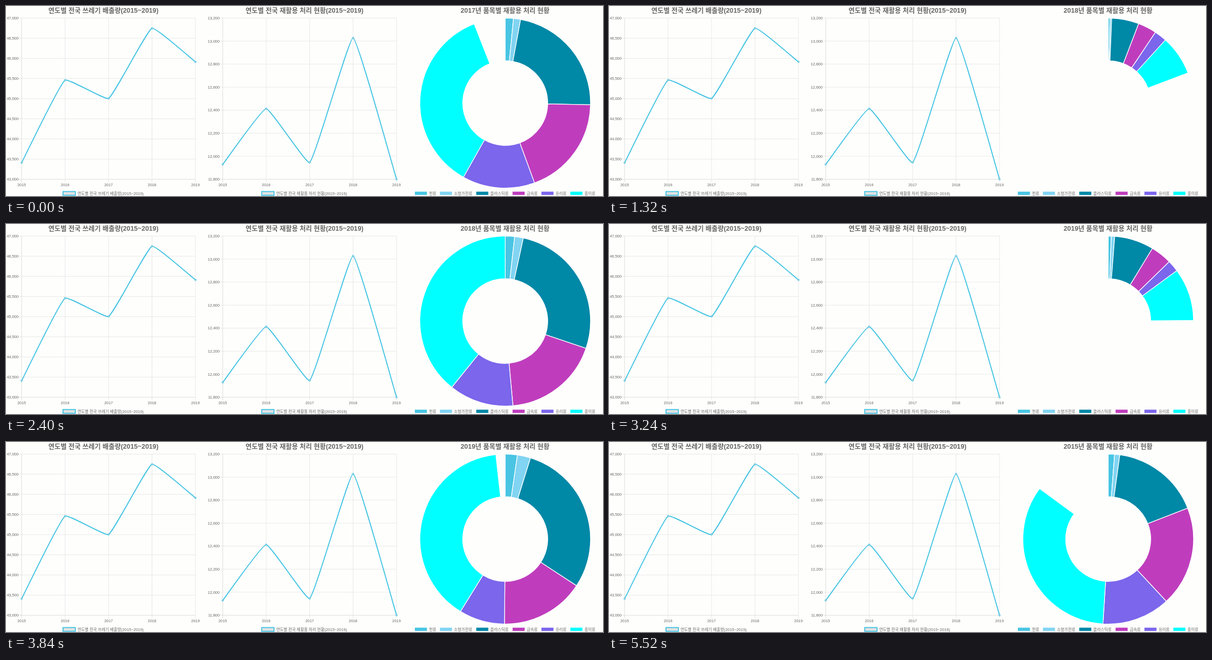
An HTML page that plays this animation: 1152x368 px, repeating every 5640 ms.

```html
<!DOCTYPE html>
<html lang="ko">
<head>
<meta charset="utf-8">
<title>재활용 현황</title>
<style>
  html, body { margin: 0; width: 100%; height: 100%; overflow: hidden; background: #fefefd; }
  svg { display: block; width: 100vw; height: 100vh; }
  text { font-family: 'Liberation Sans', 'Noto Sans CJK KR', 'Noto Sans CJK', sans-serif; font-size: 7.66px; fill: #666; }
  .title { font-size: 12.75px; font-weight: bold; fill: #666; text-anchor: middle; }
  .tick { font-size: 7.4px; }
  .grid { stroke: #e4e4e4; stroke-width: .8; }
  .axis { stroke: #d3d3d3; stroke-width: .8; }
  .line { fill: none; stroke: #41c3e2; stroke-width: 1.9; }
  .dot { fill: #a9d3df; stroke: #41c3e2; stroke-width: .8; }
  .key { fill: #e2e2e2; stroke: #41c3e2; stroke-width: 1.9; }
  .slice { stroke: #fff; stroke-width: 1.3; stroke-linejoin: bevel; }
</style>
</head>
<body>
<svg viewBox="0 0 1152 368"></svg>
<script>
const svg = document.querySelector('svg');

function add(tag, attrs, text) {
  const node = document.createElementNS('http://www.w3.org/2000/svg', tag);
  for (const name in attrs) node.setAttribute(name, attrs[name]);
  if (text) node.textContent = text;
  svg.append(node);
  return node;
}

const label = (text, x, y, cls, anchor = 'start') =>
  add('text', { x, y, class: cls, 'text-anchor': anchor }, text);
const rule = (x1, y1, x2, y2, cls) => add('line', { x1, y1, x2, y2, class: cls });

// Spline through the points; each handle follows the chord between its neighbours.
function splinePath(points, tension = 0.1) {
  const dist = (a, b) => Math.hypot(b[0] - a[0], b[1] - a[1]);
  const handles = points.map((p, i) => {
    const prev = points[i - 1] || p, next = points[i + 1] || p;
    const before = dist(prev, p), after = dist(p, next);
    const shift = amount => p.map((c, k) => c + amount * tension / (before + after) * (next[k] - prev[k]));
    return { into: shift(-before), out: shift(after) };
  });
  return points.map((p, i) =>
    i ? `C${handles[i - 1].out} ${handles[i].into} ${p}` : `M${p}`).join('');
}

function lineChart({ name, left, min, max, step, values, keyX }) {
  const top = 23.3, bottom = 335.6, width = 335.4;
  const xAt = i => left + i * width / 4;
  const yAt = v => bottom - (v - min) / (max - min) * (bottom - top);

  label(name, left + width / 2 - 9.9, 13.3, 'title');
  for (let v = min; v <= max; v += step) {
    const y = yAt(v);
    rule(left - 6, y, left + width, y, v === min ? 'axis' : 'grid');
    label(v.toLocaleString('en-US'), left - 6.2, y + 2.6, 'tick', 'end');
  }
  values.forEach((_, i) => {
    rule(xAt(i), top, xAt(i), bottom + 6, i ? 'grid' : 'axis');
    label(2015 + i, xAt(i), 349.2, 'tick', 'middle');
  });

  const points = values.map((v, i) => [xAt(i), yAt(v)]);
  add('path', { d: splinePath(points), class: 'line' });
  for (const [cx, cy] of points) add('circle', { cx, cy, r: 1.7, class: 'dot' });

  add('rect', { x: keyX, y: 359.4, width: 23.8, height: 7.2, class: 'key' });
  label(name, keyX + 28, 365.6, '');
}

lineChart({
  name: '연도별 전국 쓰레기 배출량(2015~2019)', left: 30.2, keyX: 110,
  min: 43000, max: 47000, step: 500, values: [43411, 45460, 45005, 46745, 45912]
});
lineChart({
  name: '연도별 전국 재활용 처리 현황(2015~2019)', left: 418.2, keyX: 493.4,
  min: 11800, max: 13200, step: 200, values: [11929, 12413, 11946, 13027, 11800]
});

const kinds = [
  ['천류', '#49c5e3', 789],
  ['소형가전류', '#81d4f2', 837.3],
  ['플라스틱류', '#0088a7', 907.4],
  ['금속류', '#bf3dbd', 977.5],
  ['유리류', '#7b66ec', 1033.2],
  ['종이류', '#00ffff', 1089]
];
const slices = kinds.map(([, fill]) => add('path', { fill, class: 'slice' }));
for (const [name, fill, x] of kinds) {
  add('rect', { x, y: 359.6, width: 23.3, height: 6.4, fill });
  label(name, x + 27.2, 365.6, '');
}
const yearTitle = label('', 963, 13.3, 'title', 'middle');

// Start time of each year's sweep, and where its slices end in degrees.
const years = [
  { year: 2017, start: -536, ends: [5.95, 11.05, 96.9, 170, 222.5, 360] },
  { year: 2018, start: 1265, ends: [6.4, 12.3, 108.7, 174.8, 218.8, 360] },
  { year: 2019, start: 3167, ends: [8.4, 17.55, 125.5, 183.7, 215.4, 360] },
  { year: 2015, start: 5119, ends: [5.05, 9.2, 80.7, 161, 215.6, 360] }
];
const LOOP = 5640, TICK = 120, SWEEP = 1058;
const OUTER = 164.6, INNER = 82;

function polar(radius, degrees) {
  const a = degrees * Math.PI / 180;
  return `${963.3 + radius * Math.sin(a)},${188 - radius * Math.cos(a)}`;
}

function ringSlice(from, to) {
  const large = to - from > 180 ? 1 : 0;
  return `M${polar(OUTER, from)}A${OUTER},${OUTER} 0 ${large} 1 ${polar(OUTER, to)}` +
    `L${polar(INNER, to)}A${INNER},${INNER} 0 ${large} 0 ${polar(INNER, from)}Z`;
}

function draw(time) {
  const t = Math.floor(time % LOOP / TICK) * TICK;
  const { year, start, ends } = years.filter(y => y.start <= t).pop();
  const progress = Math.min(1, (t - start) / SWEEP);
  const eased = 1 - (1 - progress) ** 4;
  yearTitle.textContent = `${year}년 품목별 재활용 처리 현황`;
  slices.forEach((slice, i) =>
    slice.setAttribute('d', ringSlice((ends[i - 1] || 0) * eased, ends[i] * eased)));
}

const origin = performance.now();
function frame() {
  draw(performance.now() - origin);
  requestAnimationFrame(frame);
}
frame();
</script>
</body>
</html>
```
